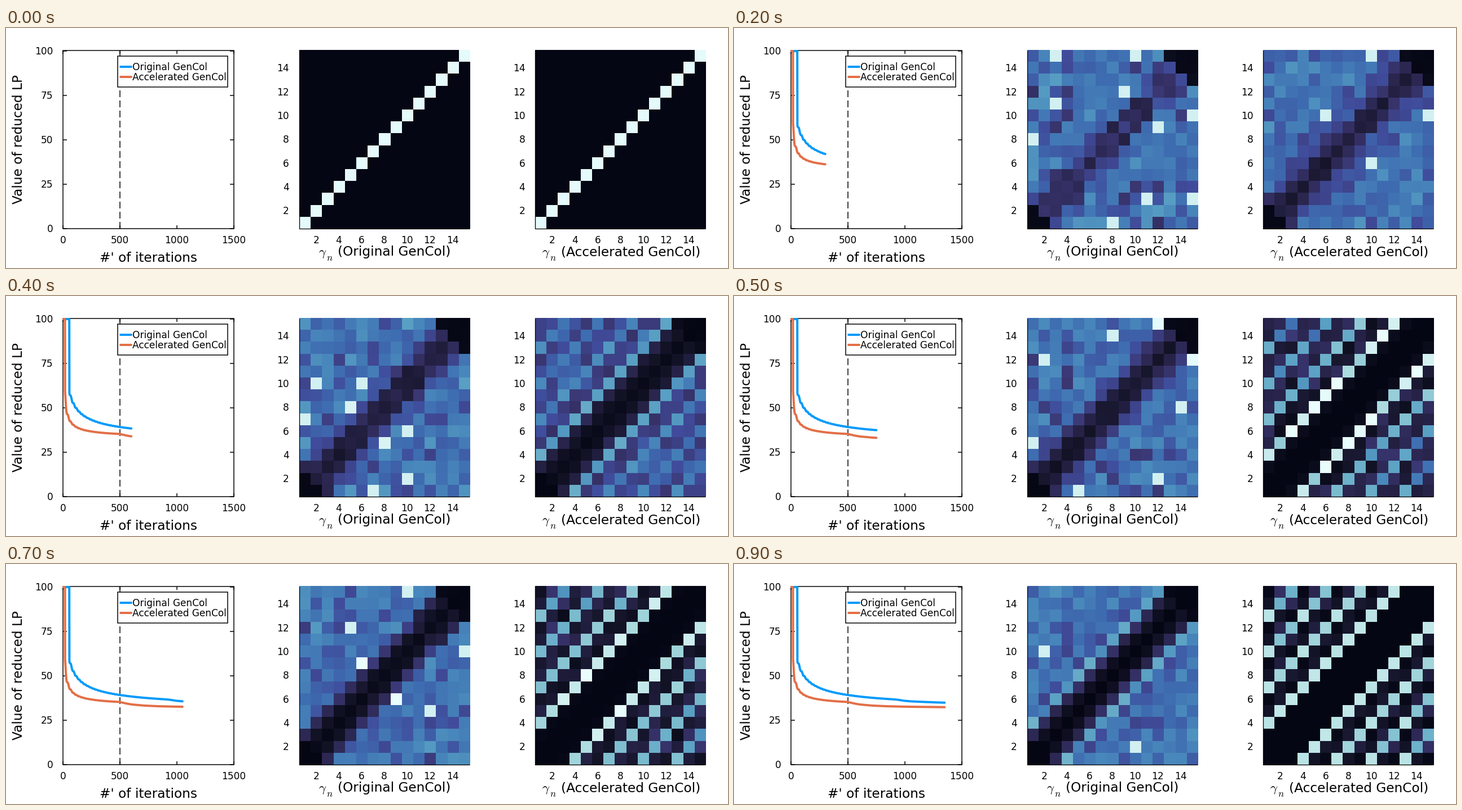
A matplotlib script that plays this animation: 1280x427 px, repeating every 1 s.

```python
import numpy as np
import matplotlib.pyplot as plt
from matplotlib.animation import FuncAnimation
from matplotlib.colors import LinearSegmentedColormap
from matplotlib.patches import Rectangle

W, H, DPI = 1280, 427, 64
FRAMES, STEP, N = 10, 150, 15
TOP, BOTTOM, SIDE = 39.5, 357, 302.3
BLUE, ORANGE = "#009afa", "#e36f47"
PT = 72 / DPI
SMALL, LARGE = 17 * PT, 23.3 * PT

ICE = LinearSegmentedColormap.from_list("ice", [
    "#040613", "#141428", "#28244a", "#3a3671", "#404c9b", "#3e6bb0",
    "#4886bb", "#59a0c4", "#79bace", "#addcdf", "#eafdfd"])

plt.rcParams["font.family"] = "DejaVu Sans"
plt.rcParams["mathtext.fontset"] = "cm"

row, col = np.indices((N, N)) + 1
dist = np.abs(row - col)
corner = (row + col <= 3) | (row + col >= 2 * N - 2)


# ---- coupling matrices ----

def noise(seed):
    """Symmetric values in -1..1."""
    r = np.triu(np.random.default_rng(seed).uniform(-1, 1, (N, N)))
    return r + np.triu(r, 1).T


def grain(k, seed):
    """Noise that keeps part of its pattern from frame to frame."""
    return 0.6 * noise(seed) + 0.6 * noise(seed + k)


def band(k, near, far, width, spread, sparks, seed):
    """Dark diagonal band in a noisy field with a few bright pairs."""
    base = far - (far - near) * np.exp(-(dist / width) ** 2)
    g = grain(k, seed)
    m = base + spread * g * base / far
    m[corner] *= 0.1
    outer = np.where(dist > 2, g, -2)
    m[outer >= np.sort(outer, axis=None)[-2 * sparks]] = 0.96
    return np.clip(m, 0, 1)


def crystal(k):
    """Stripes with period three that sharpen beside an empty band."""
    a, b = np.minimum(row % 3, col % 3), np.maximum(row % 3, col % 3)
    m = np.where(b == 2, 0.1, 0.03)
    m = np.where((a == 0) & (b == 2), 0.08 + 0.017 * (dist - 2), m)
    m = np.where(a == b, 0.93 - 0.018 * (dist - 3), m)
    m = np.where((a == 1) & (b == 1), 0.92, m)
    blur = (FRAMES - 1 - k) / (FRAMES - 1)
    far = np.clip((dist - 3) / 4, 0, 1)
    m = m + blur * (far * (0.3 - m) + 0.3 * grain(k, 40) + 0.1)
    return np.clip(np.where(dist <= 2, 0.1 * blur * (dist == 2), m), 0, 1)


def left_map(k):
    if k == 0:
        return np.eye(N) * 0.99
    if k == 1:
        m = 0.17 + 0.08 * noise(3)
        m[5, 5], m[10, 10] = 1, 0.5
        return m
    t = k / (FRAMES - 1)
    m = band(k, 0.4 * (1 - t) ** 1.6, 0.52, 2 + 0.6 * t,
             0.24 - 0.1 * t, 6 - k // 2 - k // 9, 60)
    return np.clip(m + 0.3 * t ** 4 * (dist == 3), 0, 1)


def right_map(k):
    if k == 0:
        return np.eye(N) * 0.99
    early = band(k, 0.3 / k, 0.52, 2.2, 0.12 + 0.08 / k, 2, 80)
    mix = np.clip((k - 3) / 2, 0, 1)
    return early + mix * (crystal(k) - early)


# ---- value curves ----

steps = np.arange(1, STEP * (FRAMES - 1) + 1)


def decay(start, floor, scale, power):
    """Held at 100, then a power law in small stairs."""
    n = steps + 3.5 * np.sin(steps / 4)
    return np.where(steps <= start, 100,
                    floor + scale * np.abs(n) ** -power)


plain = decay(54, 30, 233, 0.52) - 0.6 / (1 + np.exp((970 - steps) / 20))
fast = decay(16, 33, 157, 0.68)
fast -= 1.8 * (1 - np.exp(-np.maximum(steps - 500, 0) / 110))


def px(x):
    return 101.3 + x * SIDE / 1500


def py(y):
    return BOTTOM - y * 3.16


# ---- stage ----

fig = plt.figure(figsize=(W / DPI, H / DPI), dpi=DPI, facecolor="white")
ax = fig.add_axes([0, 0, 1, 1])
ax.axis("off")


def line(xs, ys, color="black", width=1.5, **kw):
    kw.setdefault("solid_capstyle", "butt")
    return ax.plot(xs, ys, color=color, lw=width * PT, **kw)[0]


def label(x, y, s, size=SMALL, ha="center", **kw):
    ax.text(x, y, s, fontsize=size, ha=ha, va="baseline", **kw)


def box(x, y, w, h, fill, z):
    ax.add_patch(Rectangle((x, y), w, h, fc=fill, ec="black",
                           lw=1.5 * PT, zorder=z))


def draw_plot():
    box(px(0), TOP, SIDE, BOTTOM - TOP, "none", 2)
    for x in range(0, 1501, 500):
        line([px(x)] * 2, [BOTTOM, BOTTOM - 6.5])
        line([px(x)] * 2, [TOP, TOP + 6.5])
        label(px(x), 383, str(x))
    for y in range(0, 101, 25):
        line([px(0), px(0) + 6.5], [py(y)] * 2)
        line([px(1500) - 6.5, px(1500)], [py(y)] * 2)
        label(83.5, py(y) + 6.2, str(y), ha="right")
    line([px(500)] * 2, [BOTTOM, TOP], dashes=(8, 4))
    label(252, 415.5, "#' of iterations", LARGE)
    label(29, 198, "Value of reduced LP", LARGE,
          rotation=90, rotation_mode="anchor")

    box(198.3, 50.3, 195, 55, "white", 6)
    for y, color, name in ((69, BLUE, "Original GenCol"),
                           (87.2, ORANGE, "Accelerated GenCol")):
        line([202.5, 222], [y, y], color, 4, zorder=7,
             solid_capstyle="round")
        label(224.5, y + 6.2, name, ha="left", zorder=7)


def draw_map(left, name, indent):
    image = ax.imshow(np.eye(N), cmap=ICE, vmin=0, vmax=1, origin="lower",
                      extent=(left, left + SIDE, BOTTOM, TOP), aspect="auto",
                      interpolation="nearest", zorder=3)
    line([left, left, left + SIDE], [TOP, BOTTOM, BOTTOM], width=1.3,
         zorder=4)
    for k in range(2, N, 2):
        part = (k - 0.5) / N
        label(left + part * SIDE, 383, str(k))
        label(left - 17.5, BOTTOM - part * (BOTTOM - TOP) + 6.2, str(k),
              ha="right")
    x = left + indent
    label(x, 405.5, r"$\gamma$", LARGE, "left")
    label(x + 14, 414, "$n$", SMALL, "left")
    label(x + 33.5, 405.5, f"({name})", LARGE, "left")
    return image


draw_plot()
maps = [(draw_map(519.5, "Original GenCol", 35), left_map),
        (draw_map(938, "Accelerated GenCol", 12), right_map)]
ax.set_xlim(0, W)
ax.set_ylim(H, 0)

clip = Rectangle((px(0) - 1, TOP - 0.5), SIDE + 1, BOTTOM - TOP + 1,
                 transform=ax.transData)
curves = []
for values, color in ((plain, BLUE), (fast, ORANGE)):
    curve = line([], [], color, 4, zorder=5, solid_capstyle="round",
                 solid_joinstyle="round")
    curve.set_clip_path(clip)
    curves.append((curve, values))


def update(k):
    n = k * STEP
    for curve, values in curves:
        curve.set_data(px(steps[:n]), py(values[:n]))
    for image, matrix in maps:
        image.set_data(matrix(k))
    return [c for c, _ in curves] + [m for m, _ in maps]


anim = FuncAnimation(fig, update, frames=FRAMES, interval=100,
                     repeat=True, repeat_delay=0, blit=False)
plt.show()
```
